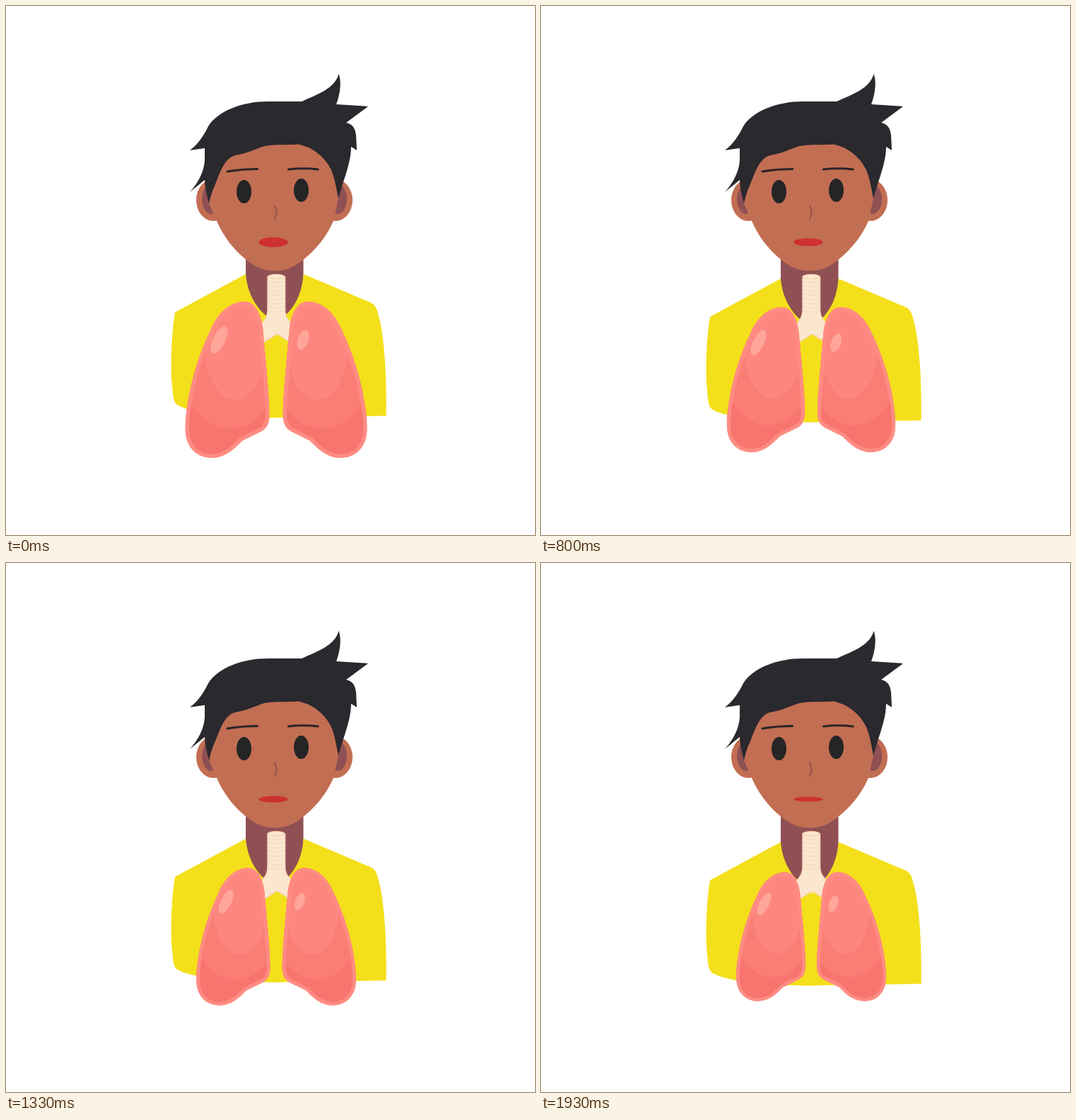
Animation, 748 px wide and 748 px high, one loop 1.99 s. Source, as an HTML page:

```html
<!DOCTYPE html>
<html lang="en">
<head>
<meta charset="utf-8">
<title>Breathing</title>
<style>
  html, body { margin: 0; width: 100%; height: 100%; overflow: hidden; background: #fff; }
  svg { display: block; width: 100vw; height: 100vh; }
</style>
</head>
<body>
<svg viewBox="0 0 748 748">
  <defs>
    <path id="lobe" d="M337 418C352 418 360 434 363 455C366 490 372 545 372.500 578C372.500 591 368 598 360 602C350 607 341 611 334 615C329 619 314 639 291 639C269 639 253.500 623 253.500 598C253 566 266 505 289 459C299 434 317 418 337 418Z"/>
    <clipPath id="lobeClip"><use href="#lobe"/></clipPath>
    <g id="lung" clip-path="url(#lobeClip)">
      <use href="#lobe" fill="#f8746f"/>
      <ellipse cx="317" cy="500" rx="71" ry="98" fill="#fa7d76"/>
      <ellipse cx="324" cy="482" rx="43" ry="75" fill="#fd8780"/>
      <use href="#lobe" fill="none" stroke="#ff8c82" stroke-width="11"/>
    </g>
  </defs>

  <path fill="#8f5054" d="M339 345H420.500V420L400 462H364L339 420Z"/>

  <g fill="#c26e52">
    <ellipse cx="293" cy="274.500" rx="24" ry="29.500"/>
    <ellipse cx="466" cy="274.500" rx="24" ry="29.500"/>
  </g>
  <g fill="#8f5054">
    <ellipse cx="290" cy="273" rx="13" ry="21"/>
    <ellipse cx="469" cy="273" rx="13" ry="21"/>
  </g>
  <path fill="#c26e52" d="M287 279C291 288 294 296 298 304C307 325 322 345 340 359C353 370 366 374.500 380 374.500C394 374.500 407 370 420 359C438 345 454 325 463 304L470 272L460 200L400 180L310 195Z"/>
  <path fill="#2a292e" d="M470.500 96C475 108 472 126 467 139L512 142L481 165C491 167 494 174 495 183L496 204L488 199C488 222 477 246 470 272C467 258 465 244 460 232C453 217 436 199 412 195.500C400 197 385 195 366 198C350 203 342 208 325 211C309 214 302 237 296 252C291 262 289 270 287 279C284 268 281 256 281 246L260 263C270 252 280 236 281 218V201L260 204C271 196 280 183 285.500 171C299 148 335 135 370 135H418C440 125 465 117 470.500 96Z"/>

  <g fill="#252526">
    <ellipse cx="336.500" cy="262.500" rx="10.500" ry="16.500"/>
    <ellipse cx="417.500" cy="260.500" rx="10.500" ry="16.500"/>
  </g>
  <g fill="none" stroke-linecap="round">
    <path stroke="#2a2526" stroke-width="3.200" d="M313 234Q334 230.500 355.500 230.500M399.500 231Q420 228.500 441 231"/>
    <path stroke="#965252" stroke-width="2" d="M380 282.500Q382 286 382 290Q384 294 379.500 301.500"/>
  </g>
  <ellipse id="mouth" cx="378" cy="334" rx="20.500" ry="7" fill="#cd302f"/>

  <path id="shirt" fill="#f4df1b" d="M339 379L239 433C234 460 232 515 235 537C236 555 238 562 243 564.500C258 573 300 580 355 581.500Q380 583 400 581.500L537.500 579.500C538.500 530 535.500 465 526 435C524 426 521 422 516 419.500L420.500 379C419 405 409 425 395 437L382 452L366 436C352 424 341 404 339 379Z"/>

  <path fill="#fbe7d0" stroke="#f8d5ba" stroke-width="1.500" stroke-linejoin="round" d="M370 383Q382 377 394.500 383V428C394.500 440 399 446 409 452V480L383.500 463.500L357 480V452C366 446 370 440 370 428Z"/>
  <ellipse cx="382" cy="382.500" rx="12" ry="3" fill="#fbe7d0" stroke="#f6c9aa"/>
  <path id="rings" fill="none" stroke="#f6d5b9"/>

  <g id="lungs">
    <use href="#lung"/>
    <use href="#lung" transform="translate(764) scale(-1 1)"/>
    <g fill="#ffa599">
      <ellipse cx="301.500" cy="472" rx="8.500" ry="21" transform="rotate(26 301.500 472)"/>
      <ellipse cx="420" cy="472" rx="7.500" ry="14.500" transform="rotate(19 420 472)"/>
    </g>
  </g>
</svg>
<script>
  const LOOP = 1990, STEP = 200 / 3, LAST = 29;
  const $ = id => document.getElementById(id);
  const mouth = $('mouth'), shirt = $('shirt'), lungs = $('lungs');

  let rings = '';
  for (let y = 389; y < 434; y += 6) rings += `M371 ${y}Q382 ${y + 4} 393.5 ${y}`;
  $('rings').setAttribute('d', rings);

  // Steps of 1/15 s, with their starts rounded to 10 ms
  function draw(ms) {
    const tick = Math.floor((ms % LOOP) / 10) * 10;
    const p = Math.floor((tick + 3.4) / STEP) / LAST;
    const scale = 1 - 0.175 * p;
    lungs.setAttribute('transform', `translate(382 528.5) scale(${scale}) translate(-382 -528.5)`);
    shirt.setAttribute('transform', `translate(0 ${15.6 * p})`);
    mouth.setAttribute('ry', 7 - 3.5 * p);
  }

  const start = performance.now();
  function frame(now) {
    draw(Math.max(0, now - start));
    requestAnimationFrame(frame);
  }
  draw(0);
  requestAnimationFrame(frame);
</script>
</body>
</html>
```
